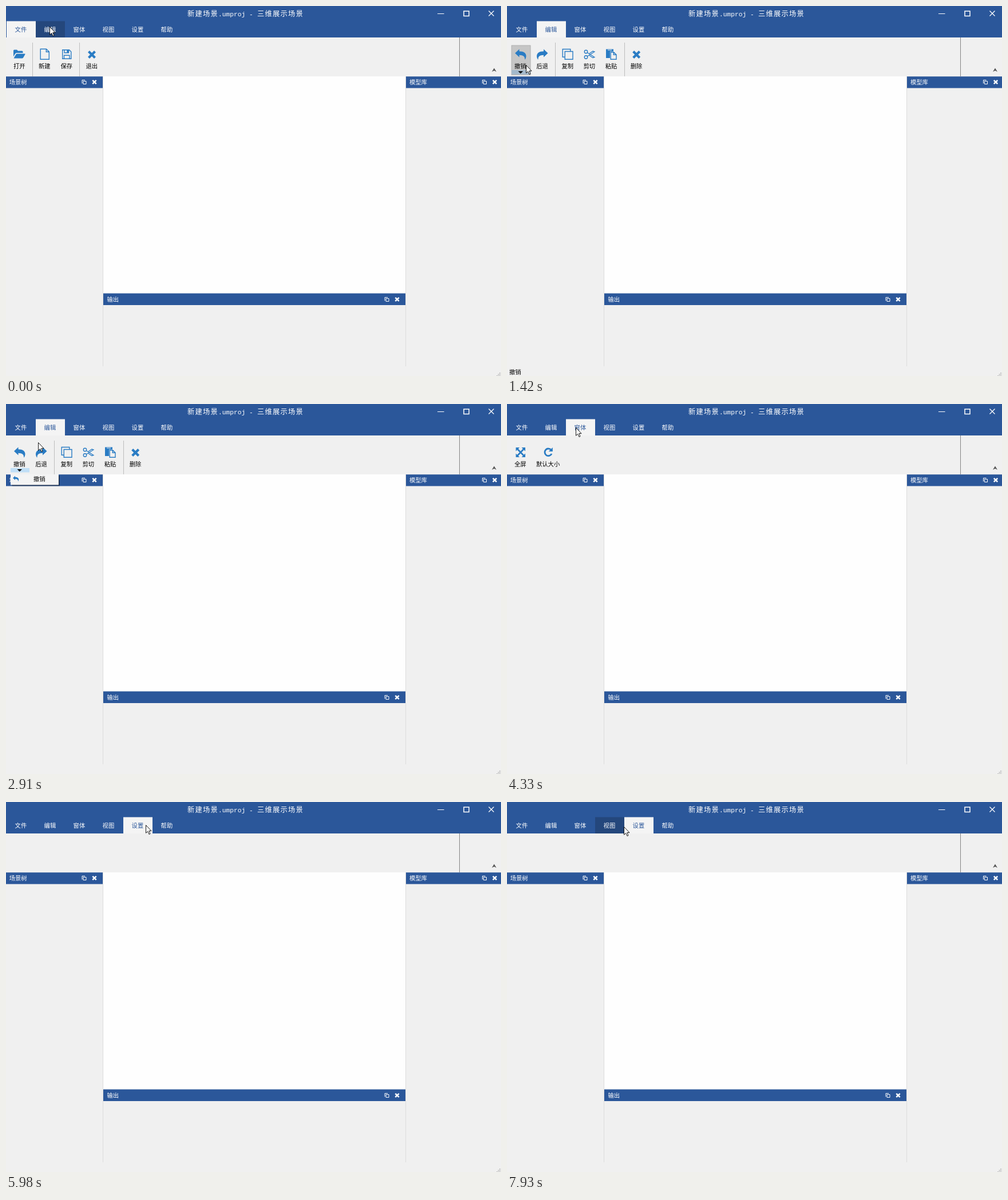
Animation of 865 by 647 pixels, one loop 8000 ms. Source, as an HTML page:

```html
<!DOCTYPE html>
<html lang="zh-CN">
<head>
<meta charset="utf-8">
<style>
html, body { margin: 0; width: 100%; height: 100%; overflow: hidden; background: #f0f0f0; }
svg { display: block; width: 865px; height: 647px; }
text { font: 10.3px 'Noto Sans CJK SC', 'Noto Sans CJK', 'Noto Sans CJK JP', sans-serif; white-space: pre; }
.title { font-size: 12.3px; letter-spacing: 1.2px; fill: #fff; }
.mono { font: 11.25px 'Liberation Mono', monospace; fill: #fff; }
.light { fill: #fff; }
.mark { font: 900 19px 'Open Sans', sans-serif; fill: #2a7cc4; text-anchor: middle; }
.line { fill: none; stroke: #2a7cc4; stroke-width: 1.4; }
.solid { fill: #2a7cc4; }
.sep { stroke: #bdbdbd; }
</style>
</head>
<body>
<svg viewBox="0 0 865 647">
  <defs>
    <path id="undo" d="M14 82.5L21.5 75.5V79.3Q33.5 79.3 33.5 88Q33.5 91 31.3 94Q32 85.8 21.5 85.8V89.5Z"/>
    <path id="cross" d="M-5.5 -5.5L5.5 5.5M5.5 -5.5L-5.5 5.5" fill="none" stroke="#2a7cc4" stroke-width="4.2"/>
    <g id="dock" fill="none" stroke="#fff">
      <path d="M-21.500 2.500V-3.500H-16.500M-19.500 -1.500H-14.500V3.500H-19.500Z" stroke-width="1"/>
      <path d="M-3.200 -3.200L3.200 3.200M3.200 -3.200L-3.200 3.200" stroke-width="2.500"/>
    </g>
  </defs>

  <rect width="865" height="647" fill="#f0f0f0"/>
  <rect width="865" height="55" fill="#2b579a"/>
  <text class="title" x="317" y="18">新建场景</text>
  <text class="mono" x="371" y="17.500">.umproj - </text>
  <text class="title" x="439" y="18">三维展示场景</text>
  <g fill="none" stroke="#fff">
    <path d="M754 13.500H765.500"/>
    <path d="M800 9H809V17.500H800Z" stroke-width="1.500"/>
    <path d="M843.500 8.500L852.500 17.500M852.500 8.500L843.500 17.500" stroke-width="1.300"/>
  </g>
  <g id="tabs"></g>

  <g id="ribbons">
    <g>
      <path class="solid" d="M13 88.500V78Q13 76.500 14.500 76.500H19L21 78.500H28Q29.500 78.500 29.500 80V82H18.500Q17 82 16 83.500ZM13.500 91.500L17.500 84.500Q18 83.500 19.500 83.500H33Q34 83.500 33.300 84.800L30 90.500Q29.400 91.500 28 91.500Z"/>
      <path class="line" d="M60.200 75.200H70.500L75.300 80V93.300H60.200ZM70.300 75.200V80.300H75.300"/>
      <path class="line" d="M98.700 76.700H110.500L113.800 80V92.300H98.700ZM102 76.700V81.800H109.500V76.700M101.500 92V86.300H111V92"/>
      <path class="solid" d="M106.300 77H109V81H106.300Z"/>
      <use href="#cross" x="150" y="85"/>
      <path class="sep" d="M46.500 64V123M128.500 64V123"/>
      <text x="13" y="109.300">打开</text><text x="57" y="109.300">新建</text>
      <text x="95.500" y="109.300">保存</text><text x="139.500" y="109.300">退出</text>
    </g>
    <g>
      <rect id="hoverUndo" x="8" y="69" width="33" height="51.500" fill="#c6c6c6" stroke="#b0b0b0"/>
      <rect id="hoverRedo" x="46" y="69" width="33" height="51.500" fill="#c6c6c6" stroke="#b0b0b0"/>
      <rect id="strip" x="8" y="112" width="33" height="7.500"/>
      <path d="M19.500 114H28L23.700 118.300Z"/>
      <use href="#undo" class="solid"/>
      <use href="#undo" class="solid" transform="matrix(-1 0 0 1 85.500 0)"/>
      <path class="line" d="M101 89.300H97.200V75.500H110.800V79M101.200 79.500H115V93.200H101.200Z"/>
      <g class="line"><circle cx="138" cy="80" r="2.700"/><circle cx="138" cy="89.500" r="2.700"/>
        <path d="M140.300 81.500L152.800 89.500L150 90.500L144 86.500M140.300 88L152.800 80L150 79L144 83"/></g>
      <path class="solid" d="M173 75.500H186V79.500H180V91H173Z"/>
      <path d="M176 77H183" stroke="#f0f0f0"/>
      <path class="line" d="M181.200 80.700H186.500L191 85V93.200H181.200ZM186.300 80.700V85.300H191"/>
      <use href="#cross" x="226.200" y="85"/>
      <path class="sep" d="M84.500 64V123M205.500 64V123"/>
      <text x="13" y="109.300">撤销</text><text x="51.200" y="109.300">后退</text>
      <text x="95.500" y="109.300">复制</text><text x="133.500" y="109.300">剪切</text>
      <text x="171.700" y="109.300">粘贴</text><text x="215.700" y="109.300">删除</text>
    </g>
    <g>
      <path class="solid" d="M15.500 76H22L15.500 82.500ZM32 76V82.500L25.500 76ZM15.500 93V86.500L22 93ZM32 93H25.500L32 86.500Z"/>
      <path class="line" d="M17.500 78L30 91M30 78L17.500 91" style="stroke-width:2.600"/>
      <path class="line" d="M77.300 80.500A6.300 6.300 0 1 0 78 87" style="stroke-width:2.800"/>
      <path class="solid" d="M79.800 76V83H72.800Z"/>
      <text x="13" y="109.300">全屏</text><text x="51" y="109.300">默认大小</text>
    </g>
    <g></g>
    <g></g>
    <g>
      <text class="mark" x="29" y="91.300">?</text><text class="mark" x="82" y="91.300">?</text>
      <text x="13" y="109.300">关于<tspan style="font:9px 'Liberation Mono',monospace">Qt</tspan></text>
      <text x="61.300" y="109.300">关于软件</text>
    </g>
  </g>
  <path d="M792.500 55V123" stroke="#848484"/>
  <path d="M849 115L853 108.500L857 115L853 113Z" fill="#555"/>

  <rect x="170" y="123" width="528" height="380" fill="#fefefe"/>
  <path d="M169.500 123V630M698.500 123V630" stroke="#dcdcdc"/>
  <path d="M0 123.300H169V143.500H0ZM699 123.300H865V143.500H699ZM170 502.500H698V523H170Z" fill="#2b579a"/>
  <text class="light" x="5.700" y="137.300">场景树</text>
  <text class="light" x="705" y="137.300">模型库</text>
  <text class="light" x="176.500" y="517.300">输出</text>
  <use href="#dock" x="154.500" y="133"/>
  <use href="#dock" x="854" y="133"/>
  <use href="#dock" x="683.500" y="513"/>
  <path d="M863 641V647M860.500 643.500V647M858 646V647" stroke="#aaa" stroke-width="1.500" stroke-dasharray="1.500 1"/>
  <text id="status" x="4" y="643.800"></text>

  <g id="menu">
    <path d="M11 125H94V143.500H11Z" fill="#000" opacity=".3"/>
    <path d="M10 125H93V142.500H10Z" fill="#1c2c48"/>
    <rect x="8" y="123" width="84" height="18.500" fill="#f4f4f4"/>
    <rect id="item" x="10" y="124" width="80" height="16.500" fill="#c0dcf3"/>
    <use href="#undo" class="solid" transform="translate(4.800 86.500) scale(.52)"/>
    <text x="48" y="135.300" style="font-weight:500">撤销</text>
  </g>

  <g id="cursor">
    <circle id="click" r="10.500" fill="#ff0" fill-opacity=".47"/>
    <path d="M.5 .5V14.300L3.600 11.400L6 16.500L8 15.600L5.800 10.600H10Z" fill="#fff" stroke="#000" stroke-width=".9"/>
  </g>
</svg>
<script>
const LOOP = 8000;
const $ = id => document.getElementById(id);
const show = (el, on) => { el.style.display = on ? '' : 'none'; };

// start, end, steps, x, y: the pointer reaches x, y in equal hops
const moves = [
  [940, 1260, 5, 36, 97], [1420, 1420, 1, 33, 103], [1500, 1660, 3, 29, 111],
  [2280, 2520, 4, 50, 130], [2750, 2910, 3, 56, 67], [2990, 3310, 5, 99, 37],
  [3930, 3930, 1, 101, 38], [4330, 4330, 1, 120, 41], [4470, 5110, 9, 167, 38],
  [5430, 5830, 6, 231, 38], [5980, 5980, 1, 244, 40], [6060, 6140, 2, 291, 41],
  [7150, 7380, 4, 241, 43], [7850, 7930, 2, 204, 43]
];
const picks = [[0, 0], [550, 1], [3930, 2], [5110, 3], [5830, 4], [6530, 5], [7460, 4]];
const clicks = [[550, 710], [1810, 1970], [3310, 3460], [3930, 4330],
  [5110, 5270], [5830, 5980], [6530, 6680], [7460, 7700]];

const tabs = ['文件', '编辑', '窗体', '视图', '设置', '帮助'].map((name, i) => {
  const add = (tag, attrs) => {
    const el = document.createElementNS('http://www.w3.org/2000/svg', tag);
    for (const key in attrs) el.setAttribute(key, attrs[key]);
    return $('tabs').appendChild(el);
  };
  const x = 1 + 51 * i;
  const back = add('rect', { x, y: 26.5, width: 51, height: 28.5 });
  const label = add('text', { x: x + 14.6, y: 45 });
  label.textContent = name;
  return { back, label };
});
const ribbons = [...$('ribbons').children];

function pointer(t) {
  let x = 76, y = 36;
  for (const [start, end, n, tx, ty] of moves) {
    if (t < start) break;
    const hop = n > 1 ? (end - start) / (n - 1) : 1;
    const k = Math.min(1, (Math.floor((t - start) / hop + 1e-6) + 1) / n);
    x += (tx - x) * k;
    y += (ty - y) * k;
  }
  return [Math.round(x), Math.round(y)];
}

function draw(t) {
  const [x, y] = pointer(t);
  const active = picks.filter(p => p[0] <= t).pop()[1];
  const over = y >= 26 && y < 55 ? Math.floor((x - 1) / 51) : -1;
  tabs.forEach(({ back, label }, i) => {
    const on = i === active;
    back.setAttribute('fill', on ? '#f4f4f4' : i === over ? '#24477c' : '#2b579a');
    label.setAttribute('fill', on ? '#2b579a' : '#fff');
    show(ribbons[i], on);
  });

  const open = t >= 1890 && t < 3310;
  const inButton = left => active === 1 && !open && x >= left && x <= left + 33 && y >= 69 && y <= 121;
  const undo = inButton(8), redo = inButton(46);
  show($('hoverUndo'), undo);
  show($('hoverRedo'), redo);
  $('strip').setAttribute('fill', open ? '#c0dff7' : undo ? '#a3b9cc' : 'none');
  $('status').textContent = undo ? '撤销' : redo ? '后退' : '';
  show($('menu'), open);
  show($('item'), y >= 123);

  show($('click'), clicks.some(([a, b]) => t >= a && t < b));
  $('cursor').setAttribute('transform', `translate(${x} ${y})`);
}

const began = performance.now();
function tick() {
  draw((performance.now() - began) % LOOP);
  requestAnimationFrame(tick);
}
tick();
</script>
</body>
</html>
```
